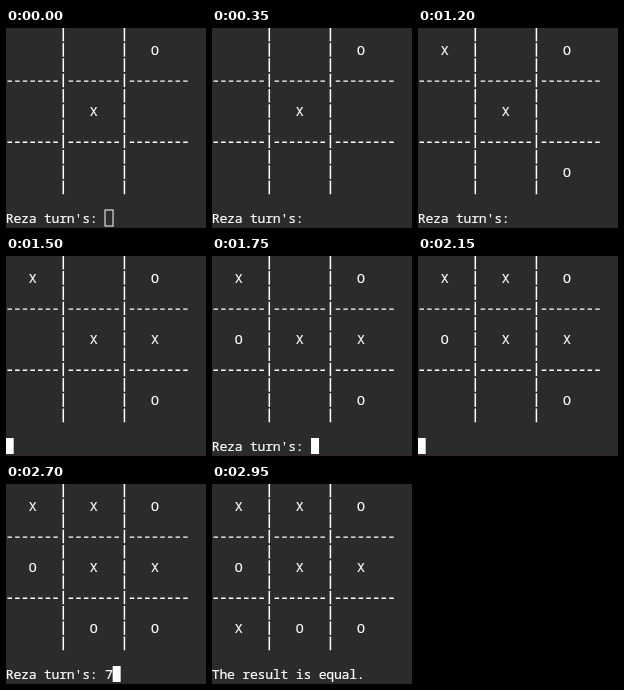
Animation, 200 px wide and 200 px high, one loop 3.55 s. Source, as an HTML page:

```html
<!DOCTYPE html>
<html lang="en">
<head>
<meta charset="utf-8">
<title>Tic-tac-toe in a terminal</title>
<style>
  html, body { margin: 0; width: 100%; height: 100%; overflow: hidden; background: #2b2b2b; }
  svg { display: block; width: 100vw; height: 100vh; }
  text {
    font: 500 13.2px "Noto Sans Mono", "DejaVu Sans Mono", monospace;
    letter-spacing: -0.28px;
    fill: #fff;
    stroke: #fff;
    stroke-width: 0.2px;
    white-space: pre;
  }
  .grid { stroke: #fff; fill: none; }
</style>
</head>
<body>
<svg id="stage" viewBox="0 0 200 200">
  <rect width="200" height="200" fill="#2b2b2b"/>
  <rect y="198.5" width="200" height="1.5" fill="#30252b"/>
</svg>
<script>
const LOOP = 3550;
const COL = 7.64, ROW = 15.28;
const PROMPT = "Reza turn's: ";
const stage = document.getElementById("stage");

function add(tag, attrs, content = "") {
  const el = document.createElementNS("http://www.w3.org/2000/svg", tag);
  for (const key in attrs) el.setAttribute(key, attrs[key]);
  el.textContent = content;
  return stage.appendChild(el);
}

const putText = (col, row, str) =>
  add("text", { x: col * COL - 0.2, y: 11.6 + row * ROW }, str);

// Board lines: one dash per character cell.
for (const col of [7, 15]) {
  const x = (col + 0.5) * COL;
  add("path", { class: "grid", d: `M${x} -0.2V${11 * ROW - 1}`,
    "stroke-width": 1.5, "stroke-dasharray": `13.6 ${ROW - 13.6}` });
}
for (const row of [3, 7]) {
  const y = 7.3 + row * ROW;
  for (const [from, to] of [[0, 7], [8, 15], [16, 24]]) {
    add("path", { class: "grid", d: `M${from * COL + 1.5} ${y}H${to * COL - 1}`,
      "stroke-width": 1.3, "stroke-dasharray": `4.5 ${COL - 4.5}` });
  }
}

// Marks: [time, symbol, board column, board row]
const marks = [
  [0, "X", 1, 1], [0, "O", 2, 0],
  [650, "X", 0, 0], [850, "O", 2, 2],
  [1450, "X", 2, 1], [1700, "O", 0, 1],
  [2150, "X", 1, 0], [2350, "O", 1, 2],
  [2750, "X", 0, 2]
].map(([at, symbol, c, r]) => ({ at, el: putText(3 + 8 * c, 1 + 4 * r, symbol) }));

// Bottom line: [time, text]
const lines = [
  [0, PROMPT], [600, PROMPT + "1"], [650, ""],
  [850, PROMPT], [1400, PROMPT + "6"], [1450, ""],
  [1700, PROMPT], [2100, PROMPT + "2"], [2150, ""],
  [2350, PROMPT], [2700, PROMPT + "7"], [2750, ""],
  [2950, "The result is equal."]
];

// Cursor: [time, look]
const looks = [
  [0, "hollow"], [50, "block"], [300, "off"], [550, "block"],
  [1000, "off"], [1350, "block"], [1800, "off"], [2100, "block"],
  [2450, "off"], [2700, "block"], [2950, "off"]
];

const line = putText(0, 12, "");
const cursor = add("rect", { y: 182, width: 8, height: 16, stroke: "#fff" });

const current = (steps, t) => steps.findLast(([at]) => at <= t)[1];

function draw(t) {
  for (const mark of marks) mark.el.style.display = t >= mark.at ? "" : "none";
  const str = current(lines, t);
  const look = current(looks, t);
  line.textContent = str;
  cursor.setAttribute("x", str.length * COL - 0.3);
  cursor.setAttribute("fill", look === "block" ? "#fff" : "none");
  cursor.setAttribute("stroke-width", look === "hollow" ? 1 : 0);
  cursor.style.display = look === "off" ? "none" : "";
}

const start = performance.now();
function tick() {
  draw((performance.now() - start) % LOOP);
  requestAnimationFrame(tick);
}
tick();
</script>
</body>
</html>
```
